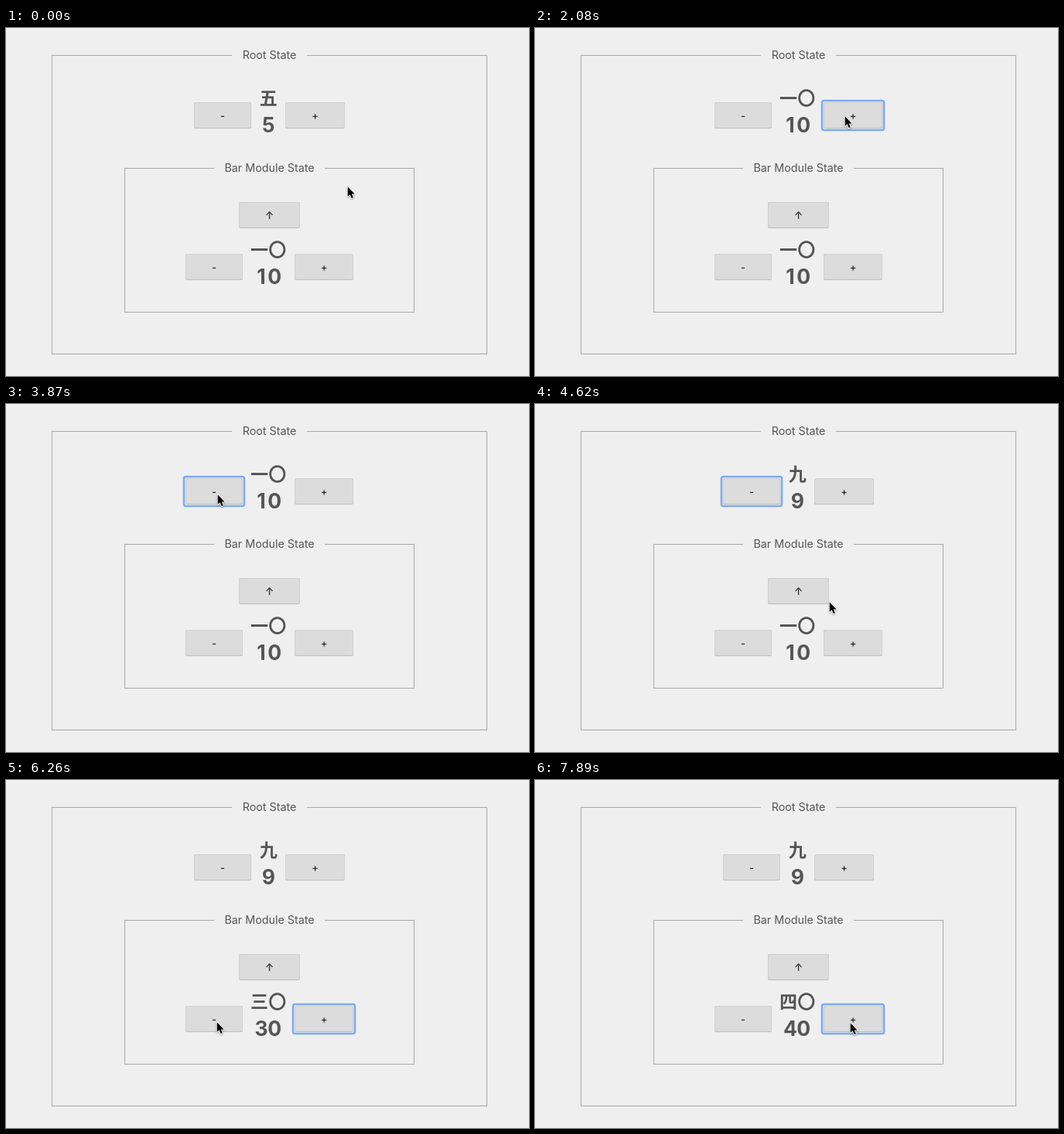
Animation, 676 px wide and 450 px high, one loop 8 s. Source, as an HTML page with a canvas:

```html
<!DOCTYPE html>
<html lang="ja">
<head>
<meta charset="utf-8">
<style>
html, body { margin: 0; width: 100%; height: 100%; overflow: hidden; background: #efefef; }
canvas { display: block; }
</style>
</head>
<body>
<canvas width="676" height="450"></canvas>
<script>
const ctx = document.querySelector('canvas').getContext('2d');
const LOOP = 8000;
const TICK = 148.8; // the picture is refreshed once per tick
const LATIN = 'Inter, "Open Sans", sans-serif';
const KANJI = '"Noto Sans CJK JP", "Noto Sans CJK", sans-serif';
const NUMERALS = '〇一二三四五六七八九';

// Pointer glides, timed in ticks
const glides = [
  { at: 1, ticks: 4, to: [400, 114] },
  { at: 21, ticks: 3, to: [273, 117] },
  { at: 30, ticks: 3, to: [434, 326] },
  { at: 33, ticks: 2, to: [415, 310] },
  { at: 39, ticks: 3, to: [272, 313] },
  { at: 44, ticks: 5, to: [407, 314] }
];

const panels = [{ start: 5, step: 1, y: 96 }, { start: 10, step: 10, y: 292 }];

// Runs of clicks on one button
const runs = [
  { panel: 0, dir: 1, ticks: [7, 9, 10, 13, 14, 19] },
  { panel: 0, dir: -1, ticks: [26, 27] },
  { panel: 1, dir: 1, ticks: [37, 38] },
  { panel: 1, dir: -1, ticks: [43, 44] },
  { panel: 1, dir: 1, ticks: [50, 52, 53] }
];

const arrow = new Path2D('M0 0V14.6L3.4 11.5L5.8 17.2L8.3 16.1L5.9 10.6H10.4Z');
const easeOut = p => 1 - (1 - p) ** 2.7;

function text(str, x, y, font, color = '#555') {
  ctx.font = font;
  ctx.fillStyle = color;
  ctx.fillText(str, x, y);
}

function fieldset(x, y, w, h, gapLeft, gapRight, title) {
  ctx.strokeStyle = '#a9a9a9';
  ctx.lineWidth = 1;
  ctx.strokeRect(x + .5, y + .5, w - 1, h - 1);
  ctx.fillStyle = '#efefef';
  ctx.fillRect(gapLeft, y, gapRight - gapLeft, 1);
  text(title, (gapLeft + gapRight) / 2, y + 5, `14.3px ${LATIN}`);
}

function fillBox(x, y, w, h, color) {
  ctx.beginPath();
  ctx.roundRect(x, y, w, h, 2.5);
  ctx.fillStyle = color;
  ctx.fill();
}

function button(label, x, y, w, focused) {
  fillBox(x, y, w, 34, '#bebebe');
  fillBox(x, y, w, 33, '#d0d0d0');
  fillBox(x + 1, y + 1, w - 2, 32, '#dcdcdc');
  if (focused) {
    ctx.beginPath();
    ctx.roundRect(x - 2, y - 2, w + 4, 38, 2.5);
    ctx.strokeStyle = '#7caaf0';
    ctx.lineWidth = 2.6;
    ctx.stroke();
  }
  text(label, x + w / 2, y + 21.7, `500 13px ${LATIN}`, '#222');
}

function counter(value, y, focus) {
  const digits = [...String(value)];
  const wide = digits.length > 1;
  button('-', wide ? 232 : 243, y, 74, focus === -1);
  button('+', wide ? 373 : 361, y, wide ? 76 : 77, focus === 1);
  digits.forEach((d, i) => {
    text(NUMERALS[d], wide ? 327.5 + 23.3 * i : 339.3, y + 2.5, `bold 23px ${KANJI}`);
    text(d, wide ? 330 + 17.3 * i : 339.3, y + 39, `bold 26.5px ${LATIN}`);
  });
}

function pointer(x, y) {
  ctx.save();
  ctx.translate(x + .7, y + .3);
  ctx.scale(.86, .86);
  ctx.lineJoin = 'round';
  ctx.lineWidth = 2;
  ctx.strokeStyle = '#fff';
  ctx.shadowColor = 'rgba(0,0,0,.35)';
  ctx.shadowBlur = 2;
  ctx.shadowOffsetY = 1;
  ctx.stroke(arrow);
  ctx.shadowColor = 'transparent';
  ctx.fillStyle = '#000';
  ctx.fill(arrow);
  ctx.restore();
}

function pointerAt(tick) {
  let pos = [441, 205];
  for (const { at, ticks, to } of glides) {
    const p = easeOut(Math.min(1, Math.max(0, (tick - at) / ticks)));
    pos = pos.map((v, i) => v + (to[i] - v) * p);
  }
  return pos.map(Math.round);
}

function draw(tick) {
  ctx.fillStyle = '#efefef';
  ctx.fillRect(0, 0, 676, 450);
  ctx.textAlign = 'center';
  fieldset(59, 35, 563, 387, 292, 389, 'Root State');
  fieldset(153, 181, 375, 187, 269, 412, 'Bar Module State');
  button('↑', 301, 225, 79);

  const values = panels.map(p => p.start);
  let focus = {};
  for (const run of runs) {
    const count = run.ticks.filter(n => n <= tick).length;
    values[run.panel] += count * run.dir * panels[run.panel].step;
    if (count) focus = run;
  }
  panels.forEach(({ y }, i) => counter(values[i], y, focus.panel === i ? focus.dir : 0));
  pointer(...pointerAt(tick));
}

const begin = performance.now();
function frame() {
  const time = (performance.now() - begin) % LOOP;
  draw(Math.floor((time + 4) / TICK));
  requestAnimationFrame(frame);
}
frame();
</script>
</body>
</html>
```
